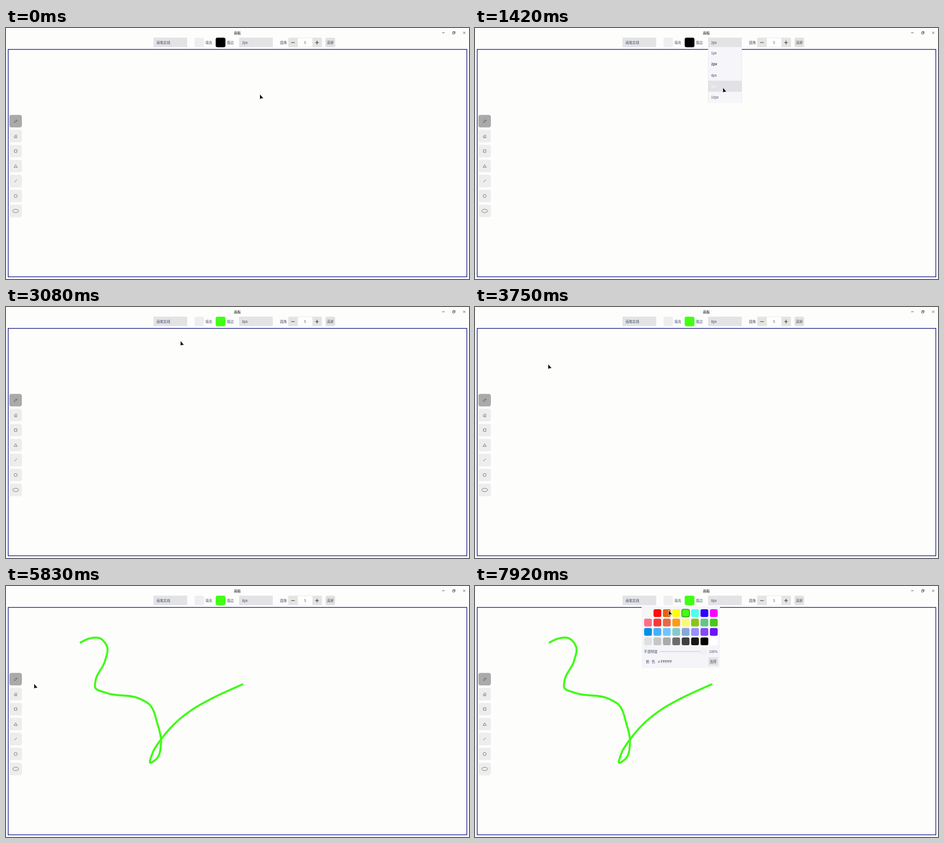
Write an HTML page that moves like this. It is 1017 px wide and 551 px high and loops after 8 s.

```html
<!DOCTYPE html>
<html lang="zh-CN">
<head>
<meta charset="utf-8">
<title>画板</title>
<style>
html, body { margin: 0; width: 100%; height: 100%; overflow: hidden; background: #fdfdfc; }
svg { display: block; width: 100%; height: 100%; }
text { font: 7.5px "Noto Sans CJK SC", "Noto Sans", sans-serif; fill: #414d68; }
.line { fill: none; stroke: #4c4c50; stroke-width: .8; }
</style>
</head>
<body>
<svg id="stage" viewBox="0 0 1017 551"></svg>
<script>
const NS = 'http://www.w3.org/2000/svg';
const LOOP = 8000, FPS = 12;
const stage = document.getElementById('stage');

function add(parent, tag, attrs, content) {
  const el = document.createElementNS(NS, tag);
  for (const k in attrs) el.setAttribute(k, attrs[k]);
  if (content) el.textContent = content;
  parent.appendChild(el);
  return el;
}
const box = (p, x, y, w, h, fill, rx = 0) =>
  add(p, 'rect', { x, y, width: w, height: h, fill, rx });
const label = (p, x, y, s, attrs = {}) =>
  add(p, 'text', { x, y: y + 2.8, ...attrs }, s);
const line = (p, d, attrs = {}) => add(p, 'path', { d, class: 'line', ...attrs });
const show = (el, on) => el.setAttribute('visibility', on ? 'visible' : 'hidden');
const middle = { 'text-anchor': 'middle' };

// Window frame
box(stage, 0, 0, 1017, 551, '#fdfdfc');
label(stage, 508.3, 11, '画板', { ...middle, style: 'fill:#111' });
line(stage, 'M958 10.5h5.5M981 9.2h4v4h-4zM982.4 9v-1.2h4v4h-1.2M1004.2 8.2l4.6 4.6m0-4.6l-4.6 4.6',
  { style: 'stroke:#222' });
add(stage, 'rect', { x: 4.8, y: 47, width: 1007.5, height: 499.2, fill: 'none',
  stroke: '#080c80', 'stroke-width': 1.4 });

// Toolbar
const bar = (x, w, fill, rx) => box(stage, x, 21.2, w, 21, fill, rx);
bar(324, 74, '#e3e3e6');
bar(414, 21, '#eeeef0', 4);
const strokeBtn = bar(460.6, 21.4, '#000', 4);
bar(512, 74, '#e3e3e6');
bar(620, 74, '#e4e4e3', 2);
box(stage, 641, 22, 32, 19.6, '#fefefe');
bar(701.7, 21.3, '#e1e1e0', 4);
label(stage, 330.7, 32, '画笔实线');
label(stage, 438, 32, '填充');
label(stage, 485, 32, '描边');
const sizeText = label(stage, 518.4, 32, '2px');
label(stage, 602, 32, '圆角');
label(stage, 656.8, 32, '5', middle);
label(stage, 704.8, 32, '清屏');
line(stage, 'M626.3 32h8M679.2 32h8M683.2 28v8', { style: 'stroke:#222;stroke-width:1.2' });

// Drawing tools, each icon drawn around its own centre
const oval = (rx, ry) => `M${-rx} 0a${rx} ${ry} 0 1 0 ${2 * rx} 0a${rx} ${ry} 0 1 0 ${-2 * rx} 0z`;
const icons = [
  'M-3 3l.5-2.5L1.5-3.3l2 2L-.5 2.5zM.5-2.3l2 2',
  'M-3.6 1l4.4-4.2 2.6 2.8-4 4h-1.6zM-1.6-.9l2.8 2.8M-.6 3.6h4.2',
  'M-2.8-2.8h5.6v5.6h-5.6z',
  'M0-2.8l3.6 5.7h-7.2z',
  'M-3 2.8l5.8-5.6',
  oval(3.4, 3.4),
  oval(6.3, 3.7)
];
icons.forEach((d, i) => {
  const tool = add(stage, 'g', { transform: `translate(21.2 ${204.5 + i * 32.85})` });
  box(tool, -13.9, -13.8, 27.6, 27.6, i ? '#ededee' : '#aaaaab', 4.5);
  line(tool, d);
});

// Freehand stroke: a spline through a few key points
const knots = [[164, 124], [182, 115.6], [207, 115], [222, 133], [217, 166], [197, 206],
  [196, 223], [220, 234.5], [293, 247.2], [315, 260], [332.5, 302], [340.5, 345],
  [331, 379], [317, 388], [323, 364], [340, 337.5], [376, 297], [415, 267.5], [450, 248], [519.5, 216]];
function smooth(pts) {
  const at = i => pts[Math.max(0, Math.min(pts.length - 1, i))];
  const dist = (p, q) => Math.hypot(q[0] - p[0], q[1] - p[1]);
  // Tangent at a knot weighted by the distance to its neighbours
  const slope = i => {
    const [a, b, c] = [at(i - 1), at(i), at(i + 1)];
    const m = dist(a, b), n = dist(b, c);
    return [0, 1].map(k => ((m ? (b[k] - a[k]) / m : 0) * n + (n ? (c[k] - b[k]) / n : 0) * m) / (m + n));
  };
  let d = `M${pts[0]}`;
  for (let i = 0; i < pts.length - 1; i++) {
    const h = dist(at(i), at(i + 1)) / 3, s = slope(i), e = slope(i + 1);
    d += `C${at(i).map((v, k) => v + s[k] * h)} ${at(i + 1).map((v, k) => v - e[k] * h)} ${at(i + 1)}`;
  }
  return d;
}
const ink = add(stage, 'path', { d: smooth(knots), fill: 'none', stroke: '#40fb14',
  'stroke-width': 4.4, 'stroke-linecap': 'round', 'stroke-linejoin': 'round' });
const inkLen = ink.getTotalLength();

// Line width menu
const ROW = 24.4, MENU_TOP = 42.5;
const menu = add(stage, 'g', {});
box(menu, 512, MENU_TOP, 74, ROW * 5, '#f6f6fa');
line(menu, 'M512.3 42.5v122M585.8 42.5v122', { style: 'stroke:#e2e2e8;stroke-width:.7' });
const hoverRow = box(menu, 512, 0, 74, ROW, '#e2e2e5');
const items = [1, 2, 4, 8, 10].map((n, i) => label(menu, 518.4, 55 + i * ROW, n + 'px'));
items[1].style.fontWeight = 700;

// Colour picker
const picker = add(stage, 'g', {});
box(picker, 366, 44.5, 172.3, 135.5, '#f5f5f9', 3);
const CELL = 20.65;
const colors = ('f6f6f2 ff0c0c ea6208 fdfd0e 40ff12 50fff0 3000ff f800ff ' +
  'ff6f82 f53a36 e86a40 f99d14 fbf978 8ac516 62c688 48c914 ' +
  '008ee6 45b0f6 70c4ff 84cacb 86a7d8 9590ff 8747f4 6a14f4 ' +
  'e0e0e0 c6c6c6 aaaaaa 6c6c6a 3e4042 161816 000000 ffffff').split(' ');
const swatches = colors.map((c, i) =>
  box(picker, 371.5 + (i % 8) * CELL, 51 + Math.floor(i / 8) * CELL, 17, 17, '#' + c, 3.5));
label(picker, 371, 144, '不透明度');
box(picker, 405.5, 142.6, 97, 2.6, '#dfdfe2', 1.3);
add(picker, 'circle', { cx: 501.7, cy: 143.8, r: 7, fill: '#f2f2ef', stroke: '#e6e6e4', 'stroke-width': .6 });
label(picker, 514, 144, '100%');
label(picker, 375.6, 166.2, '颜');
label(picker, 388, 166.2, '色');
label(picker, 402, 166.2, '#');
label(picker, 408, 166.2, 'FFFFFF', { style: 'font-weight:500;fill:#222' });
box(picker, 512.7, 156.5, 21.2, 18.5, '#e2e2e0', 1);
label(picker, 515.6, 166.2, '选择');

const pointer = add(stage, 'path', { d: 'M0 0V10.8Q0 11.5 .8 11L3 9.9 7 9.6Q8.2 9.4 7.5 8.6Z',
  fill: '#000', stroke: '#fff', 'stroke-width': .9, 'stroke-linejoin': 'round' });

// Pointer moves: start, end, then where it comes to rest
const HOME = [557.5, 145];
const moves = [
  [0, 420, 549, 31],        // to the width menu
  [660, 1420, 544.4, 130.5], // down to 8px
  [1500, 1917, 466.8, 27],  // to the stroke colour
  [2083, 2500, 461, 56],    // to green
  [2750, 3750, 160.5, 125], // to the canvas
  [3750, 3833, ...knots[0]],
  [4667, 4917, 467.4, 111],
  [4917, 5167, 428, 86],
  [5167, 6000, 19, 229],    // past the tools
  [6000, 6833, 491.5, 39.5],
  [6833, 7000, 472, 29],    // to the stroke colour again
  [7170, 7667, 522, 76],
  [7667, 7917, 425.2, 53]
];
const DRAW = [3833, 4667];
const clamp = v => Math.max(0, Math.min(1, v));
const part = (t, a, b) => clamp((t - a) / (b - a));
const ease = u => u * u * (3 - 2 * u);

function pointerAt(t) {
  let pos = HOME;
  for (const [a, b, x, y] of moves) {
    if (t < a) break;
    if (a >= DRAW[1] && pos[0] === knots[0][0]) pos = knots.at(-1);
    const u = ease(part(t, a, b));
    pos = [pos[0] + (x - pos[0]) * u, pos[1] + (y - pos[1]) * u];
  }
  if (t > DRAW[0] && t < DRAW[1]) {
    const p = ink.getPointAtLength(inkLen * part(t, ...DRAW));
    pos = [p.x, p.y];
  }
  return pos;
}

function render(ms) {
  const t = Math.floor((ms % LOOP + 5) * FPS / 1000) * 1000 / FPS % LOOP;
  const within = (a, b) => t >= a && t < b;
  const [x, y] = pointerAt(t);
  pointer.setAttribute('transform', `translate(${x.toFixed(2)} ${y.toFixed(2)})`);

  const row = Math.floor((y - MENU_TOP) / ROW);
  show(menu, within(490, 1490));
  hoverRow.setAttribute('y', MENU_TOP + row * ROW);
  hoverRow.setAttribute('height', row < 0 ? 0 : ROW);
  items.forEach((el, i) => { el.style.fill = i === row ? '#fafafa' : ''; });

  const green = t >= 2740;
  sizeText.textContent = t < 1490 ? '2px' : '8px';
  strokeBtn.setAttribute('fill', green ? '#40ff12' : '#000');
  show(picker, within(2075, 2825) || t >= 7075);
  swatches[4].setAttribute('stroke', green ? '#2c3a2c' : 'none');

  const done = part(t, ...DRAW);
  show(ink, done > 0);
  ink.setAttribute('stroke-dasharray', done < 1 ? `${inkLen * done} ${inkLen * 2}` : 'none');
}

const start = performance.now();
function tick() {
  render(performance.now() - start);
  requestAnimationFrame(tick);
}
render(0);
requestAnimationFrame(tick);
</script>
</body>
</html>
```
